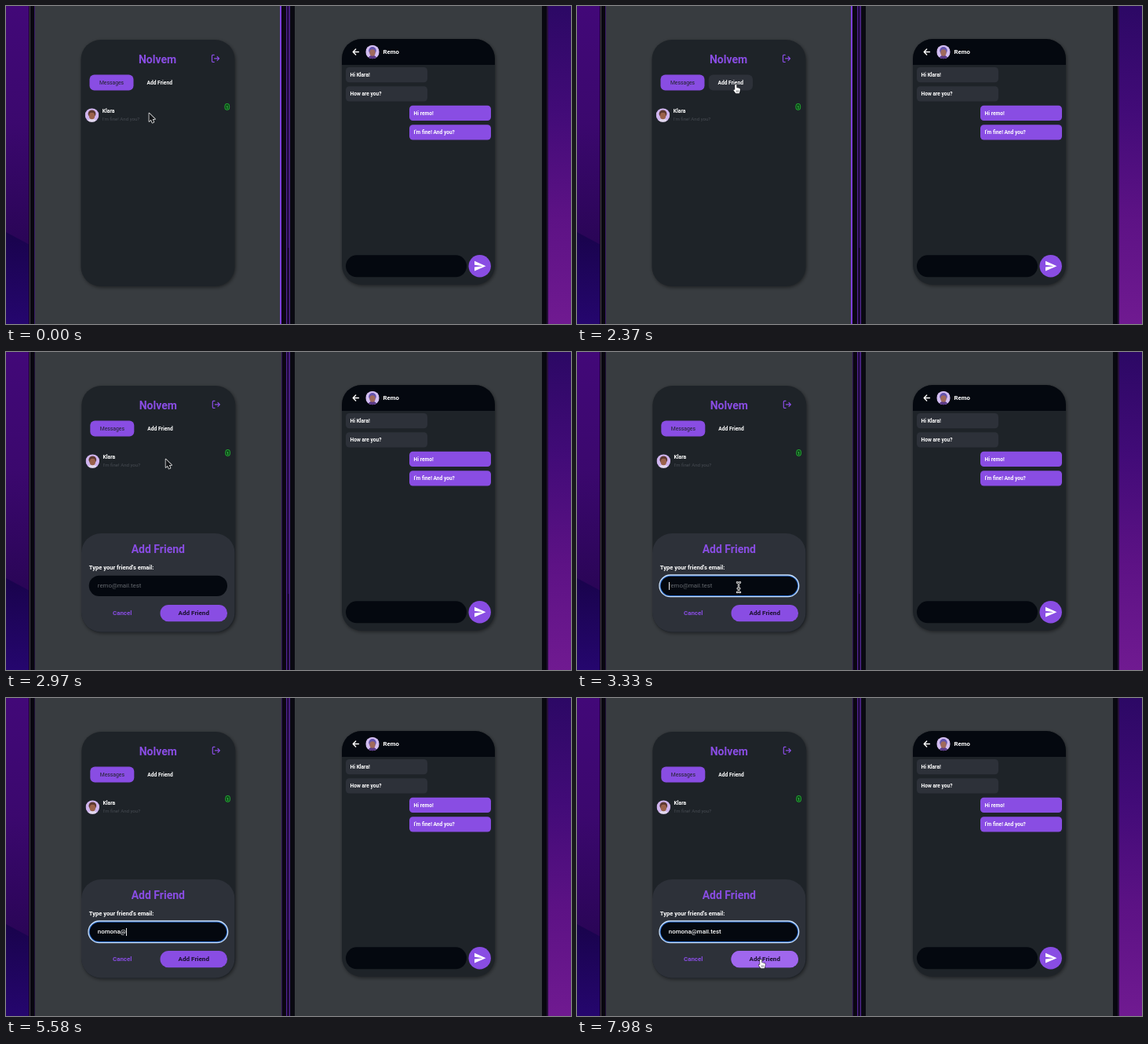
These frames come from a looping animation (720x405 px, 8000 ms). An HTML page with a canvas:

```html
<!DOCTYPE html>
<html lang="en">
<head>
<meta charset="utf-8">
<title>Chat demo</title>
<style>
html, body { margin: 0; width: 100%; height: 100%; overflow: hidden; background: #383c40; }
canvas { display: block; width: 720px; height: 405px; }
</style>
</head>
<body>
<canvas id="stage" width="720" height="405"></canvas>
<script>
const ctx = document.getElementById('stage').getContext('2d');
const LOOP = 8000;
const PURPLE = '#894de3', CARD = '#1e2328', PANEL = '#2d3139', INK = '#04080f', GRAY = '#383c40';
const EMAIL = 'nomona@mail.test', HINT = 'remo@mail.test';
const OPEN = 2490, FOCUS = 3290, FIRST_KEY = 4500, POINTER_BACK = 7200;

// time, x, y of the pointer's hot spot
const TRACK = [
  [450, 182, 136], [1020, 191.5, 87], [1260, 191.5, 87], [1560, 202.5, 100],
  [2860, 202.5, 100], [3270, 206, 299.5], [7230, 206, 299.5], [7740, 234.5, 333]
];

const clamp = v => Math.max(0, Math.min(1, v));
const smooth = v => { v = clamp(v); return v * v * (3 - 2 * v); };
const mix = (a, b, k) => a + (b - a) * k;

function pointerAt(t) {
  let i = 0;
  while (i < TRACK.length - 2 && t > TRACK[i + 1][0]) i++;
  const a = TRACK[i], b = TRACK[i + 1];
  const k = smooth((t - a[0]) / (b[0] - a[0]));
  return { x: mix(a[1], b[1], k), y: mix(a[2], b[2], k) };
}

// Three bursts: name, at sign, domain
function keyTime(i) {
  if (i < 6) return FIRST_KEY + i * 88;
  if (i === 6) return 5220;
  return 5590 + (i - 7) * 95;
}

function rect(x, y, w, h, color) {
  ctx.fillStyle = color;
  ctx.fillRect(x, y, w, h);
}

function round(x, y, w, h, r, color) {
  ctx.beginPath();
  ctx.roundRect(x, y, w, h, r);
  ctx.fillStyle = color;
  ctx.fill();
}

function disc(x, y, r, color, ry = r) {
  ctx.beginPath();
  ctx.ellipse(x, y, r, ry, 0, 0, Math.PI * 2);
  ctx.fillStyle = color;
  ctx.fill();
}

function text(str, x, y, size, color, weight = 700, align = 'left') {
  ctx.font = `${weight} ${size}px Roboto, sans-serif`;
  ctx.textAlign = align;
  ctx.fillStyle = color;
  ctx.fillText(str, x, y);
}

function line(d, color, width) {
  ctx.strokeStyle = color;
  ctx.lineWidth = width;
  ctx.lineCap = ctx.lineJoin = 'round';
  ctx.stroke(new Path2D(d));
}

function shape(d, color) {
  ctx.fillStyle = color;
  ctx.fill(new Path2D(d));
}

function gradient(y0, y1, ...colors) {
  const g = ctx.createLinearGradient(0, y0, 0, y1);
  colors.forEach((c, i) => g.addColorStop(i / (colors.length - 1), c));
  return g;
}

function shadowCard(x, y, w, h) {
  ctx.save();
  ctx.shadowColor = 'rgba(0,0,0,.45)';
  ctx.shadowBlur = 4;
  ctx.shadowOffsetX = 1;
  ctx.shadowOffsetY = 1.5;
  round(x, y, w, h, 25, CARD);
  ctx.restore();
}

function avatar(x, y, r, back, hair, skin, shirt) {
  ctx.save();
  ctx.beginPath();
  ctx.arc(x, y, r, 0, Math.PI * 2);
  ctx.clip();
  rect(x - r, y - r, 2 * r, 2 * r, back);
  disc(x, y + r * .95, r * .62, shirt, r * .45);
  disc(x, y - r * .2, r * .55, hair, r * .55);
  disc(x, y + r * .12, r * .42, skin, r * .48);
  ctx.restore();
}

function backdrop(open) {
  rect(0, 0, 720, 405, GRAY);

  rect(0, 0, 30, 405, gradient(0, 300, '#420878', '#3b086e', '#2a0557'));
  shape('M0 288L30 304V405H0Z', gradient(288, 405, '#19034c', '#25066e'));
  rect(29, 0, 1, 405, '#17051f');
  rect(30, 0, 1, 405, '#44404b');
  rect(31, 0, 5, 405, '#09070f');
  rect(36, 0, 1, 405, open ? '#20103a' : '#3a1a6b');

  const edge = open ? 351 : 349;
  rect(edge, 0, 361 - edge, 405, '#0b0713');
  if (open) rect(351, 0, 1, 405, '#2d1452');
  else rect(349, 0, 2, 405, '#7d3fdd');
  rect(357, 0, 1, 405, '#54279a');
  rect(358, 0, 3, 405, '#1b0930');
  rect(359, 0, 2, 308, '#2b0d52');
  rect(361, 0, 1, 405, '#592c9c');
  rect(362, 0, 6, 405, '#090911');

  rect(683, 0, 6, 405, '#08080f');
  rect(689, 0, 2, 405, '#251038');
  rect(691, 0, 29, 405, gradient(0, 405, '#2c0865', '#420b78', '#5d1285', '#701a91'));
}

function chat() {
  shadowCard(428, 42, 195, 313);
  round(428, 42, 195, 33, [25, 25, 0, 0], INK);
  line('M449.5 58.5H442.5M445.7 55L442.2 58.5L445.7 62', '#fff', 1.3);
  avatar(467, 58.5, 8.7, '#d3bdf2', '#6654ad', '#a06a5c', '#5a3a86');
  text('Remo', 480.5, 61.2, 7.8, '#fff');

  const bubbles = [
    ['Hi Klara!', 433, 78, PANEL], ['How are you?', 433, 102.3, PANEL],
    ['Hi remo!', 514, 126.8, PURPLE], ["I'm fine! And you?", 514, 151.2, PURPLE]
  ];
  for (const [str, x, y, color] of bubbles) {
    round(x, y, 104, 19.3, 4.5, color);
    text(str, x + 5.6, y + 12, 6.6, '#fff');
  }

  round(433, 317.3, 154, 28, 14, INK);
  disc(603.7, 331.2, 14.2, PURPLE);
  shape('M597 337.6L611.5 331.2L597 324.8V329.8L607.4 331.2L597 332.6Z', '#fff');
}

function inbox(hover) {
  shadowCard(95.5, 43, 196, 314);
  text('Nolvem', 193, 73, 14, PURPLE, 700, 'center');
  line('M265.2 62.4H263.6Q262.5 62.4 262.5 63.5V70.3Q262.5 71.4 263.6 71.4H265.2M265.6 66.9H271.4M269.2 64.5L271.6 66.9L269.2 69.3', PURPLE, 1.2);

  round(106.5, 87.5, 56, 20, 6, PURPLE);
  text('Messages', 134.5, 100.3, 6.8, CARD, 400, 'center');
  if (hover > 0) {
    ctx.globalAlpha = hover;
    round(167.7, 87.5, 56.3, 20, 6, PANEL);
    ctx.globalAlpha = 1;
  }
  text('Add Friend', 195.7, 100.3, 6.65, '#fff', 700, 'center');

  avatar(109.5, 139, 8.8, '#d0b5ef', '#5e3931', '#9a624b', '#e2d9ee');
  text('Klara', 122.8, 136.2, 6.7, '#fff');
  text("I'm fine! And you?", 122.8, 145.8, 6.1, '#474c53', 400);
  disc(281.8, 128.4, 3.4, '#23a332', 4.4);
  disc(281.8, 128.4, 2.4, '#0b4416', 3.3);
  text('1', 281.8, 130.5, 5.5, '#43d453', 700, 'center');
}

function dialog(t, lift, hover) {
  ctx.save();
  ctx.beginPath();
  ctx.roundRect(96, 43, 195.5, 313.5, 25);
  ctx.clip();
  ctx.translate(0, (1 - lift) * 126);

  round(96, 231, 195.5, 126, [25, 25, 0, 0], PANEL);
  text('Add Friend', 193.8, 255.8, 14, PURPLE, 700, 'center');
  text("Type your friend's email:", 105.8, 277, 7.55, '#fff');

  round(105.7, 284.7, 176.3, 26.3, 13.2, INK);
  if (t >= FOCUS) {
    ctx.lineWidth = 1.3;
    ctx.strokeStyle = '#2666c4';
    ctx.beginPath();
    ctx.roundRect(106, 285, 175.7, 25.7, 12.9);
    ctx.stroke();
    ctx.strokeStyle = '#c9e0fb';
    ctx.beginPath();
    ctx.roundRect(105, 284, 177.7, 27.7, 13.9);
    ctx.stroke();
  }

  let count = 0;
  while (count < EMAIL.length && t >= keyTime(count)) count++;
  const typed = EMAIL.slice(0, count);
  if (count) text(typed, 116.8, 300.4, 7.9, '#fff', 500);
  else text(HINT, 116.8, 300.4, 7.85, '#64686e', 400);

  const since = t - (count ? keyTime(count - 1) : FOCUS);
  if (since >= 0 && since % 1000 < 500) {
    const w = count ? ctx.measureText(typed).width : 0;
    rect(117 + w, 293, .9, 10, '#fff');
  }

  text('Cancel', 148.2, 335.2, 7.9, PURPLE, 700, 'center');
  round(196.5, 322, 85.5, 21.3, 10.6, PURPLE);
  if (hover > 0) {
    ctx.globalAlpha = hover;
    round(196.5, 322, 85.5, 21.3, 10.6, '#a067ee');
    ctx.globalAlpha = 1;
  }
  text('Add Friend', 239.2, 335.2, 8.1, '#18112b', 700, 'center');
  ctx.restore();
}

function pointer(kind, x, y) {
  ctx.save();
  ctx.translate(x, y);
  if (kind === 'arrow') {
    const d = 'M.4 .6V11L2.8 8.8L4.5 12.7L6.4 11.9L4.8 8.1H8Z';
    line(d, '#f4f4f4', 1.5);
    shape(d, '#15171a');
  } else if (kind === 'hand') {
    const d = 'M-1.3 1Q-1.2 -.1 -.2 -.1Q.9 -.1 .9 1V4L4.4 4.7Q5.6 5.1 5.4 6.5L4.8 9.3L4.2 11.2H-.2L-3 7.4Q-3.2 5.8 -1.3 6.7Z';
    line(d, '#17181c', 1.1);
    shape(d, '#fff');
    line('M1.2 7.6V9.6M2.8 7.6V9.6', '#33363a', .6);
  } else {
    const d = 'M-2 -6Q0 -6 0 -4.5Q0 -6 2 -6M0 -4.5V5M-2 6.5Q0 6.5 0 5Q0 6.5 2 6.5M-1.3 1.8H1.3';
    line(d, '#fff', 2.4);
    line(d, '#111', .8);
  }
  ctx.restore();
}

function draw(t) {
  const open = t >= OPEN;
  const p = pointerAt(t);
  const overTab = !open && p.x > 168 && p.x < 224 && p.y > 88 && p.y < 108;
  const overInput = open && p.y > 285 && p.y < 311;
  const overButton = open && p.x > 197 && p.y > 322;

  backdrop(open);
  chat();
  ctx.save();
  if (open) ctx.translate(.8, 0);
  inbox(open ? 1 - clamp((t - OPEN) / 120) : clamp((t - 1400) / 120));
  ctx.restore();
  if (open) dialog(t, 1 - Math.pow(1 - clamp((t - OPEN) / 320), 3), clamp((t - 7580) / 150));

  if (t < FIRST_KEY || t >= POINTER_BACK) {
    pointer(overTab || overButton ? 'hand' : overInput ? 'beam' : 'arrow', p.x, p.y);
  }
}

const start = performance.now();
function tick() {
  draw((performance.now() - start) % LOOP);
  requestAnimationFrame(tick);
}
tick();
</script>
</body>
</html>
```
